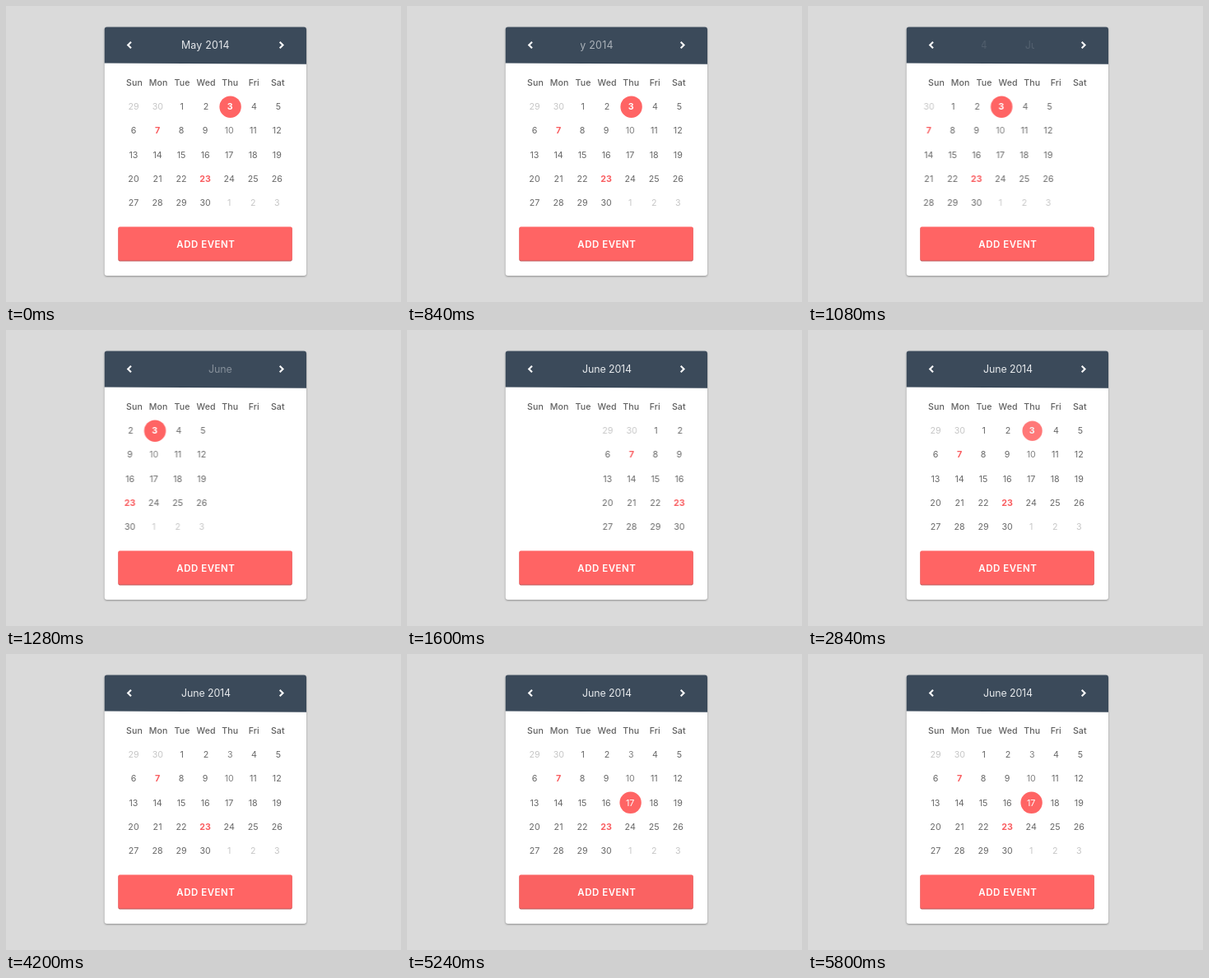
An HTML page for the animation above (7 s loop, 480 px wide and 360 px high).

```html
<!DOCTYPE html>
<html lang="en">
<head>
<meta charset="utf-8">
<title>Calendar</title>
<style>
  html, body { margin: 0; width: 100%; height: 100%; overflow: hidden; background: #dadada; }
  svg { display: block; width: 480px; height: 360px; }
  text { font-family: Inter, "Open Sans", sans-serif; text-anchor: middle; }

  .card { fill: #fff; filter: drop-shadow(0 1px 1px rgba(0, 0, 0, .35)); }
  .head { fill: #3b4a5a; }
  .arrow { fill: none; stroke: #fff; stroke-width: 2.1; }
  .title { font-size: 12.4px; fill: #e6e9ec; }
  .weekday { font-size: 10.6px; font-weight: 500; letter-spacing: .1px; fill: #606060; }
  .day { font-size: 10.7px; fill: #686868; }
  .muted { fill: #c6c6c6; }
  .thin { fill: #808080; }
  .marked { fill: #f95d60; font-weight: 700; }
  .picked { fill: #fff; }
  .bold { font-weight: 700; }
  .dot { fill: #ff6464; transform-box: fill-box; transform-origin: center; }
  .button { fill: #ff6464; }
  .edge { fill: #b9585a; }
  .label { font-size: 11.5px; font-weight: 600; letter-spacing: .5px; fill: #fff; }

  .may, .june, .strip, .anim, .anim .dot, .button { animation: 7s linear infinite both; }
  .may { letter-spacing: .25px; animation-name: titleOut; }
  .june { letter-spacing: -.1px; animation-name: titleIn; }
  .strip { animation-name: slide; }
  .button { animation-name: press; }
  .d3 { animation-name: fade3; }
  .d3 .dot { animation-name: size3; }
  .d10 { animation-name: fade10; }
  .d10 .dot { animation-name: size10; }
  .d17 { animation-name: fade17; }
  .d17 .dot { animation-name: size17; }

  @keyframes titleOut {
    0% { transform: none; opacity: 1; }
    4% { transform: none; opacity: 1; animation-timing-function: cubic-bezier(.4, 0, .75, .25); }
    16%, 100% { transform: translateX(-62px); opacity: 0; }
  }
  @keyframes titleIn {
    0% { transform: translateX(60px); opacity: 0; }
    13.714% { transform: translateX(60px); opacity: 0; animation-timing-function: cubic-bezier(.33, .25, .67, .61); }
    22.857%, 100% { transform: none; opacity: 1; }
  }
  @keyframes slide {
    0% { transform: none; }
    12.571% { transform: none; animation-timing-function: cubic-bezier(.3, .125, .7, .62); }
    26.286%, 100% { transform: translateX(-287px); }
  }
  @keyframes fade3 {
    0% { opacity: 1; }
    40% { opacity: 1; animation-timing-function: cubic-bezier(.3, .125, .7, .62); }
    42.857%, 100% { opacity: 0; }
  }
  @keyframes size3 { 0%, 40% { transform: none; } 42.857%, 100% { transform: scale(.6); } }
  @keyframes fade10 {
    0%, 45.143% { opacity: 0; }
    48.571%, 56.571% { opacity: 1; }
    60%, 100% { opacity: 0; }
  }
  @keyframes size10 {
    0%, 45.143% { transform: scale(.6); }
    48.571%, 56.571% { transform: none; }
    60%, 100% { transform: scale(.6); }
  }
  @keyframes fade17 { 0%, 62.286% { opacity: 0; } 65.714%, 100% { opacity: 1; } }
  @keyframes size17 { 0%, 62.286% { transform: scale(.6); } 65.714%, 100% { transform: none; } }
  @keyframes press {
    0%, 74.286% { fill: #ff6464; }
    77.143%, 80% { fill: #e95858; }
    82.857%, 100% { fill: #ff6464; }
  }
</style>
</head>
<body>
<svg viewBox="0 0 480 360">
  <defs>
    <clipPath id="cardClip"><rect x="119.7" y="25.5" width="245.3" height="302.5" rx="3"/></clipPath>
    <clipPath id="titleClip"><rect x="211" y="36" width="64" height="24"/></clipPath>
    <clipPath id="gridClip"><rect x="139" y="106" width="204.5" height="140"/></clipPath>
  </defs>

  <rect class="card" x="119.7" y="25.5" width="245.3" height="302.5" rx="3"/>
  <path class="head" clip-path="url(#cardClip)" d="M119 25H366V70.8L119 69.4Z"/>
  <path class="arrow" d="M152 43.7L148.2 47.5L152 51.3M332.7 43.7L336.5 47.5L332.7 51.3"/>
  <g clip-path="url(#titleClip)">
    <text class="title may" x="242.3" y="52">May 2014</text>
    <text class="title june" x="243" y="52">June 2014</text>
  </g>

  <g id="weekdays"></g>
  <g clip-path="url(#gridClip)"><g class="strip" id="strip"></g></g>

  <rect class="edge" x="136.4" y="269" width="211.3" height="41.5" rx="2"/>
  <rect class="button" x="136.4" y="268.4" width="211.3" height="41.2" rx="2"/>
  <text class="label" x="242.8" y="293.5">ADD EVENT</text>
</svg>

<script>
  const label = (x, y, cls, str) =>
    `<text class="${cls}" x="${x}" y="${y + 3.9}">${str}</text>`;

  const rowY = row => 122.5 + row * 29.05;
  const colX = (col, row) => 155 + col * (row ? 29.05 : 29.3);

  function dayClass(i, n, second) {
    if (i < 2 || i > 31) return 'day muted';
    if (n === 7 || n === 23) return 'day marked';
    return n === 10 || (second && n === 3) ? 'day thin' : 'day';
  }

  // A dot with its white number, laid over the plain one.
  function picked(n, x, y, cls) {
    const weight = n === 3 ? ' bold' : '';
    return `<g class="${cls}"><circle class="dot" cx="${x + .4}" cy="${y + .2}" r="13.2"/>` +
      label(x, y, 'day picked' + weight, n) + '</g>';
  }

  function month(shift, second) {
    let out = '';
    for (let i = 0; i < 35; i++) {
      const n = i < 2 ? 29 + i : i < 32 ? i - 1 : i - 31;
      const row = Math.floor(i / 7);
      const x = colX(i % 7, row) + shift, y = rowY(row);
      out += label(x, y, dayClass(i, n, second), n);
      if (i < 32 && (n === 3 || (second && (n === 10 || n === 17))))
        out += picked(n, x, y, second ? 'anim d' + n : '');
    }
    return out;
  }

  document.getElementById('weekdays').innerHTML =
    ['Sun', 'Mon', 'Tue', 'Wed', 'Thu', 'Fri', 'Sat']
      .map((name, i) => label(156 + i * 29.05, 93.5, 'weekday', name)).join('');
  document.getElementById('strip').innerHTML = month(0, false) + month(287, true);
</script>
</body>
</html>
```
